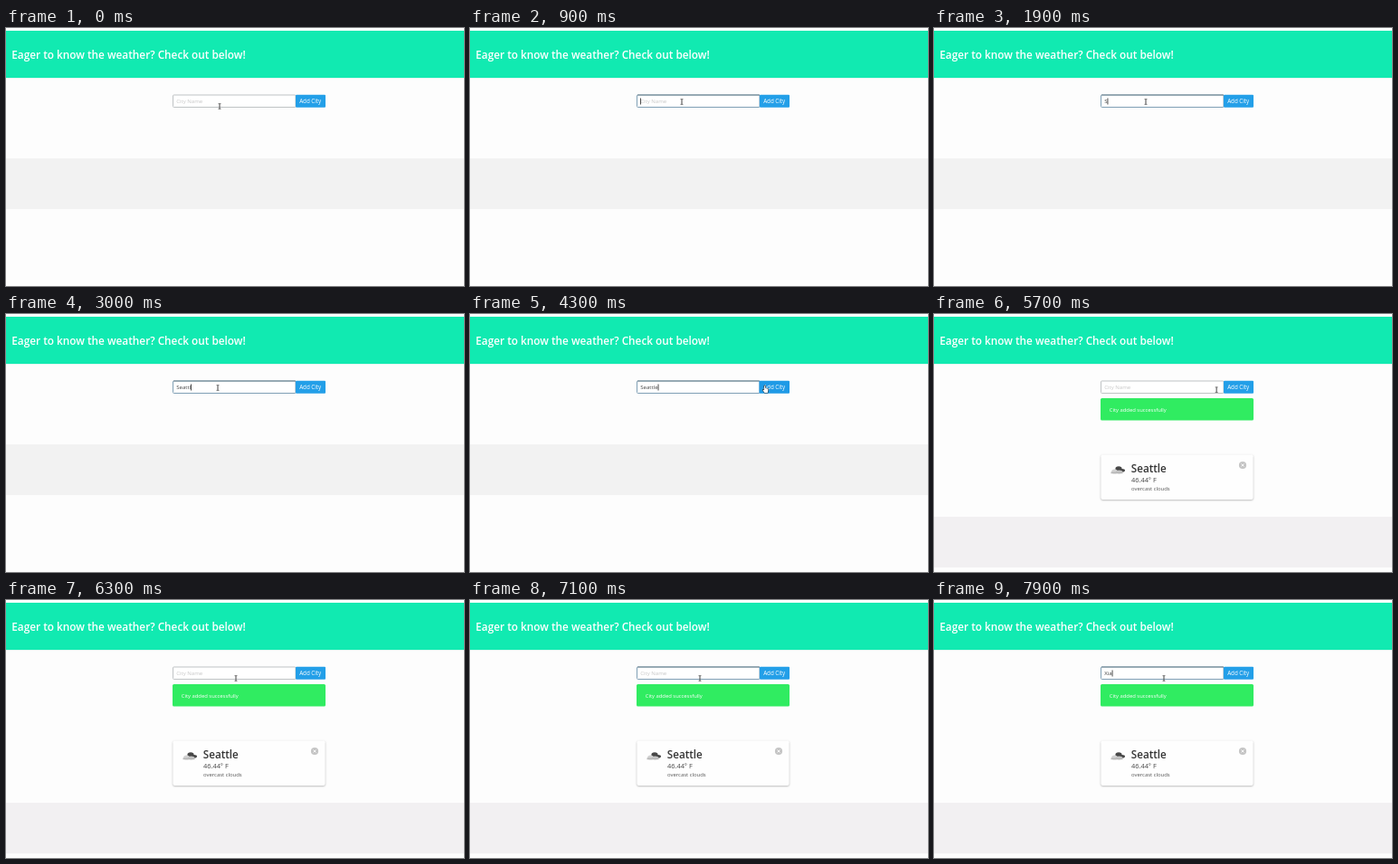
Recreate the animation shown at these times as an HTML page with a canvas. Size 506x285 px, loop 8000 ms.

```html
<!DOCTYPE html>
<html lang="en">
<head>
<meta charset="utf-8">
<title>Weather</title>
<style>
  html, body { margin: 0; width: 100%; height: 100%; overflow: hidden; background: #fdfdfd; }
  canvas { display: block; }
</style>
</head>
<body>
<canvas width="506" height="285"></canvas>
<script>
const LOOP = 8000;
const ctx = document.querySelector('canvas').getContext('2d');

// Key presses: [time, field content]
const keys = [
  [0, ''], [1900, 'S'], [2100, 'Se'], [2300, 'Sea'], [2600, 'Seat'], [2800, 'Seatt'],
  [3000, 'Seattl'], [3100, 'Seattle'], [4800, ''], [7300, 'X'], [7500, 'Xi'], [7700, 'Xia']
];
// Pointer stops: [time, x, y]
const stops = [
  [0, 236, 86.5], [100, 236, 86.5], [500, 234, 81.5], [3700, 234, 81.5],
  [4200, 326.5, 83], [5500, 326.5, 83], [6200, 254, 86.5], [LOOP, 254, 86.5]
];
const focusSpans = [[600, 4500], [6500, LOOP]];
const ADDED = 4800;

function rect(x, y, w, h, color) {
  ctx.fillStyle = color;
  ctx.fillRect(x, y, w, h);
}

function box(x, y, w, h, r, fill, stroke) {
  ctx.beginPath();
  ctx.roundRect(x, y, w, h, r);
  ctx.fillStyle = fill;
  ctx.fill();
  if (stroke) {
    ctx.strokeStyle = stroke;
    ctx.lineWidth = 1;
    ctx.stroke();
  }
}

function text(str, x, y, size, color, weight = 400) {
  ctx.font = `${weight} ${size}px "Open Sans", "Noto Sans", sans-serif`;
  ctx.fillStyle = color;
  ctx.fillText(str, x, y);
}

function ellipse(x, y, rx, ry, color) {
  ctx.beginPath();
  ctx.ellipse(x, y, rx, ry, 0, 0, 2 * Math.PI);
  ctx.fillStyle = color;
  ctx.fill();
}

function pointerAt(t) {
  const i = stops.findIndex(s => s[0] > t);
  const [t0, x0, y0] = stops[i - 1], [t1, x1, y1] = stops[i];
  const k = (t - t0) / (t1 - t0), e = k * k * (3 - 2 * k);
  return [x0 + (x1 - x0) * e, y0 + (y1 - y0) * e];
}

function drawPage(added) {
  rect(0, 0, 506, 285, '#fdfdfd');
  rect(0, 0, 506, 3, '#fff');
  rect(0, 3, 506, 52, '#11eab1');
  rect(0, 55, 506, 1, '#e4f7f2');
  rect(0, added ? 224 : 144, 506, 56, added ? '#f2f0f2' : '#f2f2f2');
  text('Eager to know the weather? Check out below!', 6.2, 34.2, 11.8, '#fff', 600);
}

function drawField(value, focused, caretOn) {
  box(184.5, 74, 135.5, 13.5, 1, '#fff', focused ? '#7f9fb5' : '#bfc3c5');
  if (focused) rect(185, 73.5, 135, 1, '#72868f');
  if (value) text(value, 188.2, 83.4, 6.1, '#444');
  else text('City Name', 188.2, 83.4, 6.05, '#c6c6c6');
  if (caretOn) rect(188.2 + (value ? ctx.measureText(value).width : 0), 77.5, 0.8, 7, '#222');
}

function drawButton(hover) {
  box(hover ? 319.5 : 320, 73.7, hover ? 33.5 : 33, 14, 1, hover ? '#1f9ae6' : '#239fe8');
  text('Add City', 324.2, 83.4, 6.2, '#fff');
}

function drawCloud() {
  ellipse(204, 171, 3.6, 2.8, '#484848');
  ellipse(208, 172.8, 3, 1.8, '#484848');
  rect(203, 171.5, 5, 3, '#484848');
  ellipse(199.5, 174, 3.4, 2.6, '#d2d2d2');
  ellipse(204.5, 174.5, 3.6, 1.9, '#c8c8c8');
  rect(195.5, 174.5, 13, 1.7, '#b8b8b8');
}

function drawCard() {
  box(184, 93, 169, 24.5, 1.5, '#30ec61');
  text('City added successfully', 193.8, 107.5, 5.87, '#fff');

  ctx.save();
  ctx.shadowColor = 'rgba(0,0,0,.3)';
  ctx.shadowBlur = 2;
  ctx.shadowOffsetY = 0.7;
  box(184.3, 155.2, 168.4, 49.8, 2, '#fefefe');
  ctx.restore();

  drawCloud();
  text('Seattle', 217.8, 175.1, 11.65, '#333', 600);
  text('46.44° F', 218, 185.7, 7.4, '#444');
  text('overcast clouds', 218, 194.8, 5.95, '#555');

  ellipse(341, 167, 4.1, 4.1, '#c5c5c5');
  ctx.strokeStyle = '#fff';
  ctx.lineWidth = 1;
  ctx.beginPath();
  ctx.moveTo(339.6, 165.6); ctx.lineTo(342.4, 168.4);
  ctx.moveTo(342.4, 165.6); ctx.lineTo(339.6, 168.4);
  ctx.stroke();
}

function drawBeam(x, y) {
  rect(x - 0.5, y - 3, 1, 6, '#444');
  rect(x - 1.5, y - 3.2, 3, 0.8, '#666');
  rect(x - 1.5, y + 2.4, 3, 0.8, '#666');
}

function drawHand(x, y) {
  const hand = new Path2D('M-1.4-3.5Q-.8-4.2-.2-3.5V-1L2.2-.4Q3-.1 2.9.8L2.3 3.9H-1L-3 1.2Q-2.9.2-1.4 1Z');
  ctx.save();
  ctx.translate(x, y);
  ctx.lineWidth = 1.2;
  ctx.strokeStyle = '#23323c';
  ctx.stroke(hand);
  ctx.fillStyle = '#fff';
  ctx.fill(hand);
  ctx.restore();
}

function draw(t) {
  const added = t >= ADDED;
  const [keyTime, value] = keys.findLast(k => k[0] <= t);
  const span = focusSpans.find(([from, to]) => t >= from && t < to);
  const caretOn = !!span && (t - Math.max(span[0], keyTime)) % 1060 < 530;
  const [x, y] = pointerAt(t);
  const hover = x > 320;

  drawPage(added);
  drawField(value, !!span, caretOn);
  drawButton(hover);
  if (added) drawCard();
  (hover ? drawHand : drawBeam)(x, y);
}

function tick() {
  // Hold each 100 ms step, as in a screen recording
  draw(Math.floor(performance.now() % LOOP / 100) * 100);
  requestAnimationFrame(tick);
}
tick();
</script>
</body>
</html>
```
